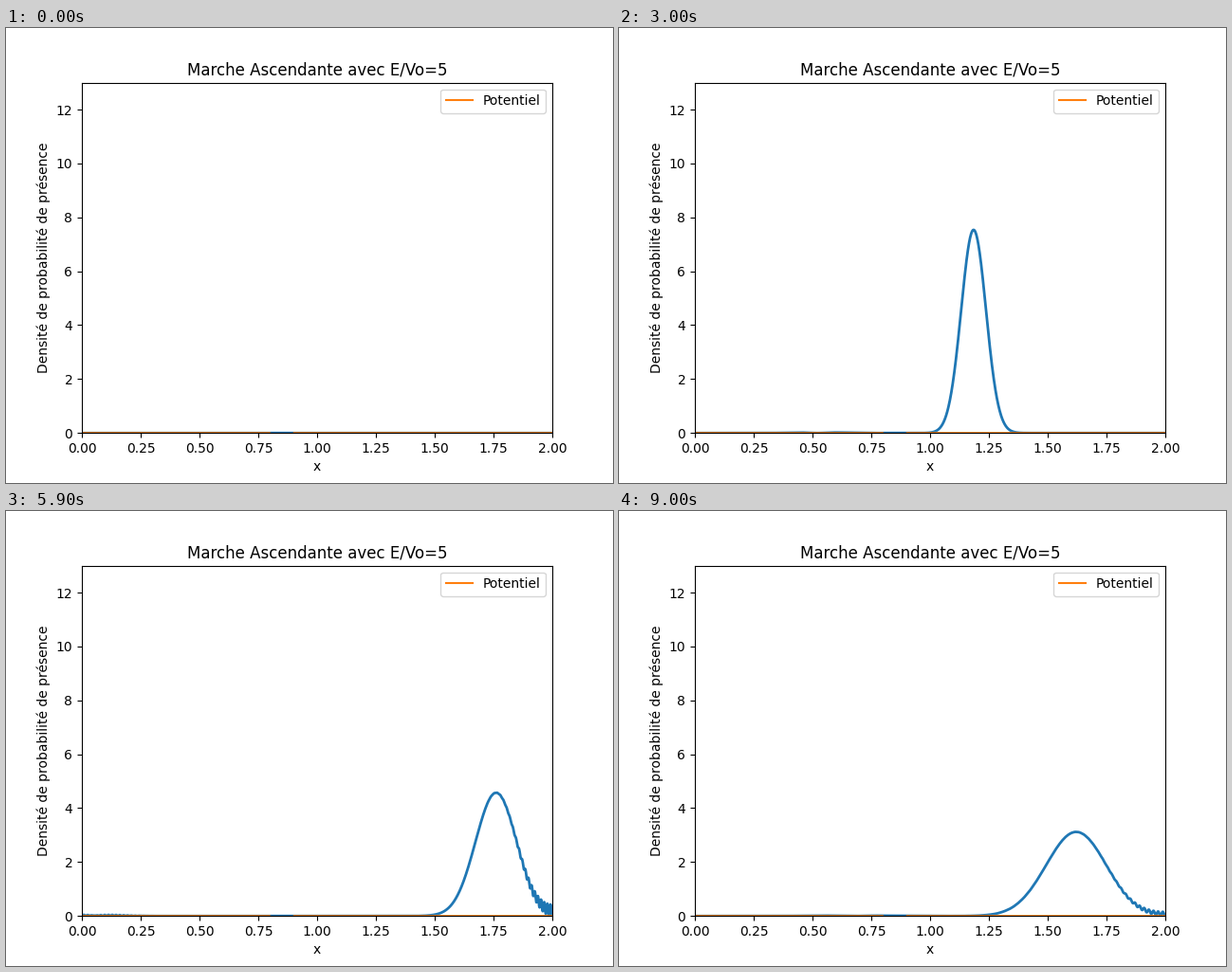
These frames come from a looping animation (640 by 480 pixels, 9100 ms). A matplotlib script:

```python
import numpy as np
import matplotlib.pyplot as plt
from matplotlib.animation import FuncAnimation

DT, DX = 1e-7, 1e-3
NX = 2000
FRAMES = 91
STEPS = 1000          # time steps between two frames
RATIO = 5             # energy over potential depth
V0 = -4000
XC, SIGMA = 0.6, 0.05

x = np.linspace(0, (NX - 1) * DX, NX)
V = np.zeros(NX)
V[(x >= 0.8) & (x <= 0.9)] = V0


def simulate():
    """Leapfrog Schrodinger solver for a Gaussian packet crossing the well."""
    s = DT / DX**2
    k = np.sqrt(2 * abs(RATIO * V0))
    amp = 1 / np.sqrt(SIGMA * np.sqrt(np.pi))
    psi = amp * np.exp(1j * k * x - (x - XC)**2 / (2 * SIGMA**2))
    re, im = psi.real.copy(), psi.imag.copy()
    diag = 2 * (s + V[1:-1] * DT)
    density = np.zeros((FRAMES, NX))
    for i in range(1, (FRAMES - 2) * STEPS + 2):
        if i % 2:
            keep = i % STEPS == 1
            if keep:
                old = im[1:-1].copy()
            im[1:-1] += s * (re[2:] + re[:-2]) - diag * re[1:-1]
            if keep:
                density[i // STEPS + 1, 1:-1] = re[1:-1]**2 + im[1:-1] * old
        else:
            re[1:-1] -= s * (im[2:] + im[:-2]) - diag * im[1:-1]
    return density


density = simulate()

fig, ax = plt.subplots(figsize=(6.4, 4.8), dpi=100)
line, = ax.plot([], [], lw=2)
ax.plot(x, V, label="Potentiel")
ax.set_xlim(0, 2)
ax.set_ylim(0, 13)
ax.set_title(f"Marche Ascendante avec E/Vo={RATIO}")
ax.set_xlabel("x")
ax.set_ylabel("Densité de probabilité de présence")
ax.legend(loc="best")


def draw(i):
    line.set_data(x, density[i])
    return line,


anim = FuncAnimation(fig, draw, frames=FRAMES, interval=100,
                     repeat=True, repeat_delay=0, blit=False)
plt.show()
```
